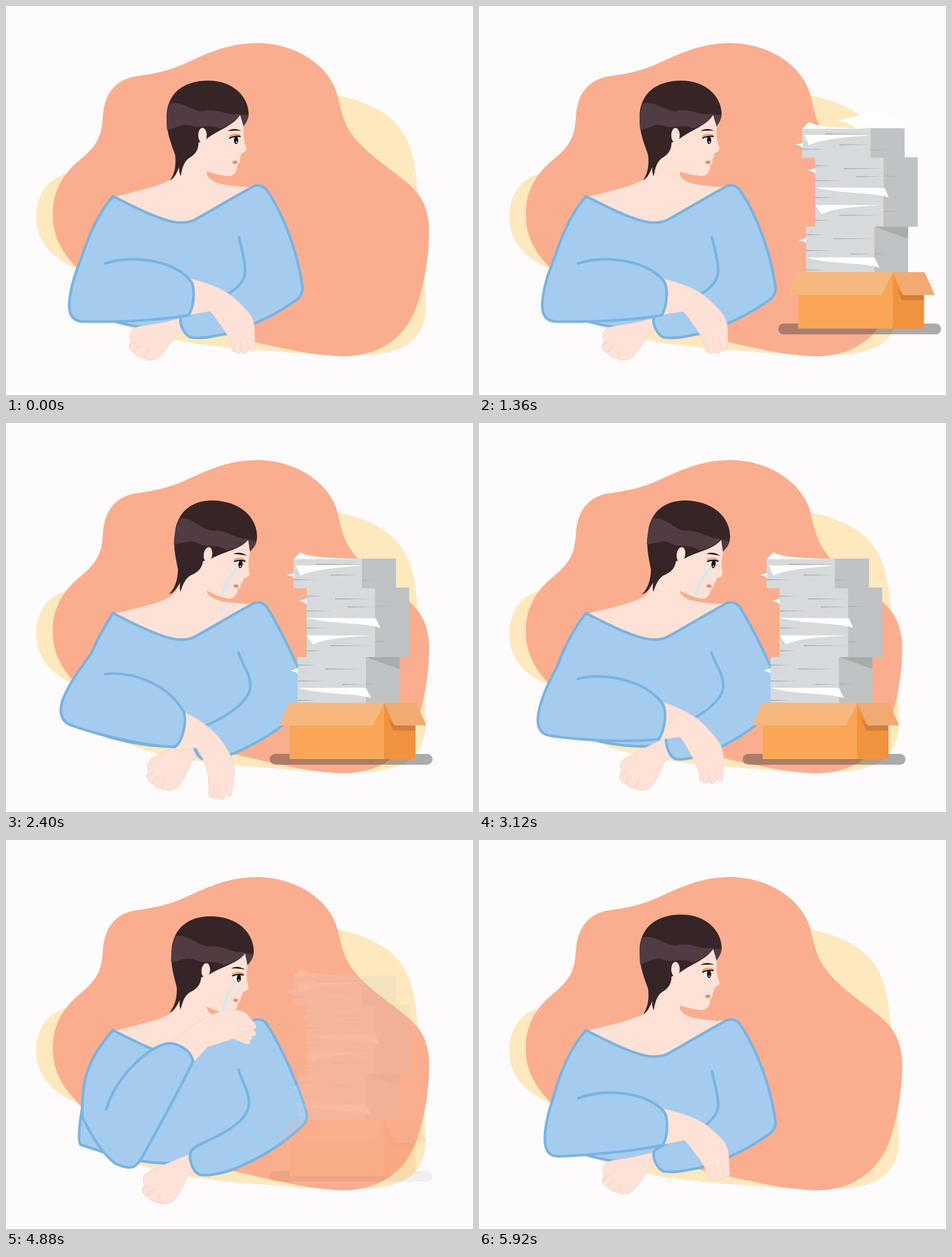
These frames come from a looping animation (820x683 px, 6 s). An HTML page:

```html
<!DOCTYPE html>
<html lang="en">
<head>
<meta charset="utf-8">
<title>Too much paperwork</title>
<style>
html, body { margin: 0; width: 100%; height: 100%; overflow: hidden; background: #fdfbfc; }
svg { display: block; width: 100vw; height: 100vh; }
.knit { fill: #a3ccef; stroke: #7ab3df; stroke-width: 4.6; stroke-linecap: round; stroke-linejoin: round; }
.skin { fill: #fee2d7; }
.hand { fill: #fee2d7; stroke: #f9d3c7; stroke-width: 1.2; stroke-linejoin: round; }
.light { fill: #d6dadc; }
.dark { fill: #bfc3c5; }
.white { fill: #fff; }
.line { fill: none; stroke-linecap: round; }
</style>
</head>
<body>
<svg viewBox="0 0 820 683" preserveAspectRatio="none">
  <path fill="#fee8be" d="M105 295C70 305 53 335 53 372C53 415 85 445 125 462L195 555C250 582 330 596 440 604C490 608 530 611 560 612L640 612C705 608 740 580 737 520C736 500 735 480 733 460L723 330C721 300 718 278 712 256C702 222 683 199 655 183C632 170 608 162 583 157Z"/>
  <path fill="#faae8f" d="M440 65C510 65 565 105 580 150C590 185 590 205 615 235C650 275 700 300 722 328C742 352 744 385 743 405C741 450 735 485 722 525C705 575 665 612 600 615C540 615 480 600 385 578C300 555 190 530 125 460C95 430 82 400 82 365C82 325 100 295 130 270C160 245 168 230 170 195C173 150 195 130 225 124C262 118 275 117 310 103C350 85 385 66 440 65Z"/>

  <path class="skin" d="M190 335C230 325 270 317 292 303C300 295 305 285 305 270L352 270L353 297C360 312 385 316 432 318L315 385L250 375Z"/>
  <g id="head">
    <path class="skin" d="M345 195L411 188C416 200 418 210 417 225C418 238 420 243 422 249C423 255 417 257 413 259C414 263 411 266 410 270C412 275 407 278 406 281C406 287 403 296 395 298C380 299 365 294 352 290L330 305L300 300L320 230Z"/>
    <path fill="#362426" d="M288 306C296 295 299 280 297 262C290 240 282 225 282 195C282 155 310 131 355 131C400 131 425 160 426 188C426 198 421 206 417 211C416 203 414 197 411 191C400 210 375 216 351 234L338 240C338 255 330 262 320 268C312 275 309 285 307 299C304 293 304 288 304 283C299 295 295 303 288 306Z"/>
    <path fill="#503c42" d="M287 171C312 167 322 183 345 185C368 179 385 190 401 190C412 188 420 194 426 190C426 199 421 206 417 211L411 191C402 204 388 210 376 215C358 207 345 214 330 212C310 203 300 215 283 218C281 200 283 185 287 171Z"/>
    <ellipse class="skin" cx="345" cy="227" rx="7.5" ry="13"/>
    <path fill="#241517" d="M389 219.500C396 214.500 405 215 413 219C405 218.500 397 218.500 389 219.500Z"/>
    <path class="line" stroke="#f0a06c" stroke-width="3" d="M393 229C398 225 405 225 410 227"/>
    <path fill="#fff" d="M394 232C399 228 406 229 410 231L406 243C401 243 397 238 394 232Z"/>
    <ellipse fill="#241517" cx="404" cy="235.500" rx="3.800" ry="7"/>
    <path class="line" stroke="#241517" stroke-width="2.400" d="M393 232C398 229 406 228 411 229"/>
    <circle fill="#fff" cx="404.500" cy="239" r="1.200"/>
    <ellipse fill="#e6916f" cx="402" cy="274.500" rx="4.500" ry="3"/>
    <path id="tear" class="line" stroke="#cfeaf3" stroke-width="4" pathLength="1" d="M400 241C396 252 384 262 381 293"/>
  </g>
  <path id="drop" fill="#cfeaf3" d="M0-5C3-1 4 1 3 3A3.500 3.500 0 0 1-3 3C-4 1-3-1 0-5Z"/>

  <path class="knit" d="M188 334C225 353 270 376 300 380C312 381 322 380 330 376C365 357 400 335 436 316L445 325C465 370 480 430 470 500L400 540L300 567C260 570 220 562 183 552L131 535C126 528 129 500 133 475C140 425 160 375 188 334Z"/>
  <path id="farHand" class="hand"/>
  <path id="fingers" class="line" stroke="#f7cbbd" stroke-width="1.200" d="M217 597C221 592 227 589 230 589M226 609C229 601 234 597 238 596M244 619C244 611 247 606 250 604"/>
  <path id="farArm" class="knit"/>
  <path id="hand" class="hand"/>
  <path id="arm" class="knit"/>

  <g id="stack">
    <rect x="463" y="581" width="286" height="19" rx="9.500" fill="#2c2c2c" opacity=".39"/>
    <path class="light" d="M505 238h120v52h-120zM528 289h120v122h-120zM512 411h120v81h-120z"/>
    <path class="dark" d="M625 238h60v52h-60zM648 289h60v122h-60zM632 411h59v81h-59z"/>
    <path fill="#a9acad" d="M632 411H691V432Z"/>
    <path id="edges" fill="#aeb2b4"/>
    <path class="white" d="M505 239L517 227C530 236 570 237 622 239ZM509 250H625C590 254 540 256 517 268ZM493 267C498 266 502 264 506 264V272C502 268 498 268 493 267ZM515 312C520 311 524 309 528 309V318C524 314 520 314 515 312ZM499 435C504 434 508 431 512 431V440C508 436 504 436 499 435ZM528 342L650 343L657 360C635 350 570 354 528 342ZM528 373H648C600 376 560 378 539 389ZM512 465H632L641 483C610 473 560 478 512 465Z"/>
    <path id="sheet" class="white" d="M566 225C590 220 610 215 622 208C650 207 680 225 693 235L690 239C670 235 630 236 600 239C592 232 580 227 566 225Z"/>
    <path fill="#f9a756" d="M498 491H664V590H498Z"/>
    <path fill="#f1923f" d="M664 491H719V590H664Z"/>
    <path fill="#d17f3b" d="M682 531L671 518L680 540H719V531Z"/>
    <path fill="#f7b87f" d="M497 491H664L645 531H480Z"/>
    <path fill="#f1ab72" d="M664 491H720L738 531H682Z"/>
  </g>
</svg>
<script>
const $ = id => document.getElementById(id);
const set = (id, name, value) => $(id).setAttribute(name, value);

// Near arm: hanging, resting, lifting, at the mouth
const sleeves = [
  'M174 441C225 435 285 460 312 507C318 525 310 560 296 569C240 566 170 550 115 531C95 524 93 505 100 485C112 455 130 432 150 404C160 380 172 358 188 334',
  'M174 452C220 437 290 445 322 480C333 490 331 525 321 543C260 553 190 555 135 554C112 553 109 535 112 512C116 480 128 455 135 435C148 395 165 360 188 334',
  'M178 469C205 425 260 385 310 382C325 383 338 405 341 425C310 470 270 510 225 565C208 585 195 579 176 563C155 540 145 510 135 475C132 425 142 385 188 334',
  'M175 474C185 420 240 360 270 352C290 348 318 360 322 378C300 430 265 500 240 553C230 575 218 576 195 567C170 550 150 515 134 491C132 425 142 385 188 334'
];
const hands = [
  'M310 507C335 517 362 535 380 560C395 583 401 595 401 615L396 652C393 657 388 656 387 650L383 659C379 663 374 662 373 657C370 661 366 660 364 657C359 659 356 655 356 650C357 640 356 620 352 605C347 590 340 578 335 570L298 575ZM387 650L386 628M373 657L374 632M364 657L365 635',
  'M322 478C355 487 385 497 405 517C425 535 436 548 436 565L437 600C436 607 428 607 426 600L424 607C420 611 415 611 413 606C410 611 406 611 403 607C399 609 397 605 397 600C396 590 388 575 378 562C370 550 362 538 358 536L322 542ZM426 602L421 580M413 606L410 582M403 607L400 585',
  'M308 380C335 365 370 350 405 347C425 347 440 350 447 360L461 380C463 386 459 389 455 386L461 396C462 402 456 404 452 400C456 407 451 410 447 406C450 414 443 417 439 413C430 407 420 402 410 399C395 397 380 394 374 395L345 425ZM455 386L440 374M452 400L433 385M447 406L428 393',
  'M275 355C305 325 340 300 375 287C392 284 408 290 414 296L427 312C429 318 425 321 421 319L427 324C427 331 421 333 416 329C424 333 420 338 415 336C420 341 416 346 411 344C404 342 398 338 392 336C380 342 350 355 345 357L320 382ZM421 319L398 312M416 329L392 321M415 336L392 330'
];
// Far arm: upright, leaning
const farArms = [
  'M409 406C414 430 420 445 420 465C419 490 395 505 370 515C345 527 320 535 308 546C303 555 312 578 325 582C345 585 370 579 390 575C430 562 470 545 510 516C520 508 522 500 520 490C512 435 490 370 458 323C450 314 443 314 436 316',
  'M408 403C418 430 429 440 429 462C428 485 400 505 380 517C360 528 340 535 331 545C325 555 330 580 343 589C355 593 380 588 400 580C440 563 480 540 515 505C535 490 533 480 527 465C511 422 482 362 458 323C450 314 443 314 436 316'
];
const farHands = [
  'M312 546C285 556 262 558 240 562C224 564 217 570 217 580C221 586 219 590 216 597C217 604 222 608 226 609C231 616 237 618 244 619C252 624 262 621 268 617C282 605 290 588 300 574L318 566Z',
  'M335 550C310 560 290 572 270 582C256 588 248 594 248 604C251 610 250 614 247 620C248 628 254 632 258 633C263 641 270 642 276 642C284 647 294 645 301 640C312 628 318 612 325 595L342 580Z'
];

// Thin paper edges: x, y, width
const edges = [[545, 247, 80], [505, 274, 42], [570, 266, 55], [528, 303, 30], [578, 308, 70], [528, 329, 48],
  [600, 322, 48], [528, 359, 40], [570, 390, 78], [528, 399, 30], [512, 424, 34], [560, 431, 72],
  [512, 452, 50], [590, 458, 42], [512, 486, 36], [625, 275, 36], [648, 321, 30], [648, 383, 34], [632, 457, 26]];
set('edges', 'd', edges.map(([x, y, w]) => `M${x} ${y}l${w} 1l${-w} 1z`).join(''));

const smooth = p => p * p * (3 - 2 * p);
const linear = p => p;
const speedUp = p => p * p;
const slowDown = p => 1 - (1 - p) ** 1.1;

// Keys are [time, value, easing towards this key]
function track(t, keys) {
  const i = keys.findIndex(k => t < k[0]);
  if (i === 0) return keys[0][1];
  if (i < 0) return keys[keys.length - 1][1];
  const [t0, a] = keys[i - 1], [t1, b, ease = smooth] = keys[i];
  return a + (b - a) * ease((t - t0) / (t1 - t0));
}

// Catmull-Rom curve through four neighbouring values
const spline = (a, b, c, d, f) =>
  b + f * (c - a + f * (2 * a - 5 * b + 4 * c - d + f * (3 * (b - c) + d - a))) / 2;

function morph(poses, at) {
  const last = poses.length - 1;
  const i = Math.min(last - 1, Math.floor(at));
  const near = [i - 1, i, i + 1, i + 2].map(k => poses[Math.max(0, Math.min(last, k))].match(/\d+/g));
  let n = 0;
  return poses[i].replace(/\d+/g, () => {
    const value = spline(...near.map(p => +p[n]), at - i);
    n++;
    return value.toFixed(2);
  });
}

function draw(t) {
  const raise = track(t, [[1680, 1], [2320, 0], [2920, 0], [3520, 3], [4320, 3], [5280, 2, speedUp], [6000, 1, slowDown]]);
  const nod = track(t, [[1640, 0], [2320, 1], [4400, 1], [5500, 0]]);
  const lean = track(t, [[1640, 0], [2320, 1], [4400, 1], [5750, 0]]);
  set('arm', 'd', morph(sleeves, raise));
  set('hand', 'd', morph(hands, raise));
  set('farArm', 'd', morph(farArms, lean));
  set('farHand', 'd', morph(farHands, lean));
  set('fingers', 'transform', `translate(${31 * lean} ${24 * lean})`);
  set('head', 'transform', `translate(${nod} ${-2 * nod}) rotate(${8.5 * nod} 310 288)`);

  const flow = track(t, [[1440, 0], [2240, 1, linear]]);
  set('tear', 'stroke-dasharray', `${flow} 2`);
  set('tear', 'opacity', flow && track(t, [[5120, 1], [5760, 0]]));
  const fall = (t - 2240) % 480 / 480;
  set('drop', 'transform', `translate(378 ${305 + 63 * fall})`);
  set('drop', 'opacity', t >= 2240 && t < 3200 ? 1 - fall * fall : 0);

  const away = (1 - track(t, [[1000, 0], [1845, 1, linear]])) ** 3;
  set('stack', 'transform', `translate(${330 * away} ${-124 * away})`);
  set('stack', 'opacity', track(t, [[1000, 0], [1300, 1, linear], [4400, 1], [5040, 0]]));
  const fly = track(t, [[1600, 0], [2320, 1]]);
  set('sheet', 'transform', `translate(${125 * fly} ${-25 * fly})`);
  set('sheet', 'opacity', track(t, [[2000, 1], [2360, 0]]));
}

function tick(now) {
  draw(Math.floor(now % 6000 / 80) * 80);
  requestAnimationFrame(tick);
}
tick(performance.now());
</script>
</body>
</html>
```
